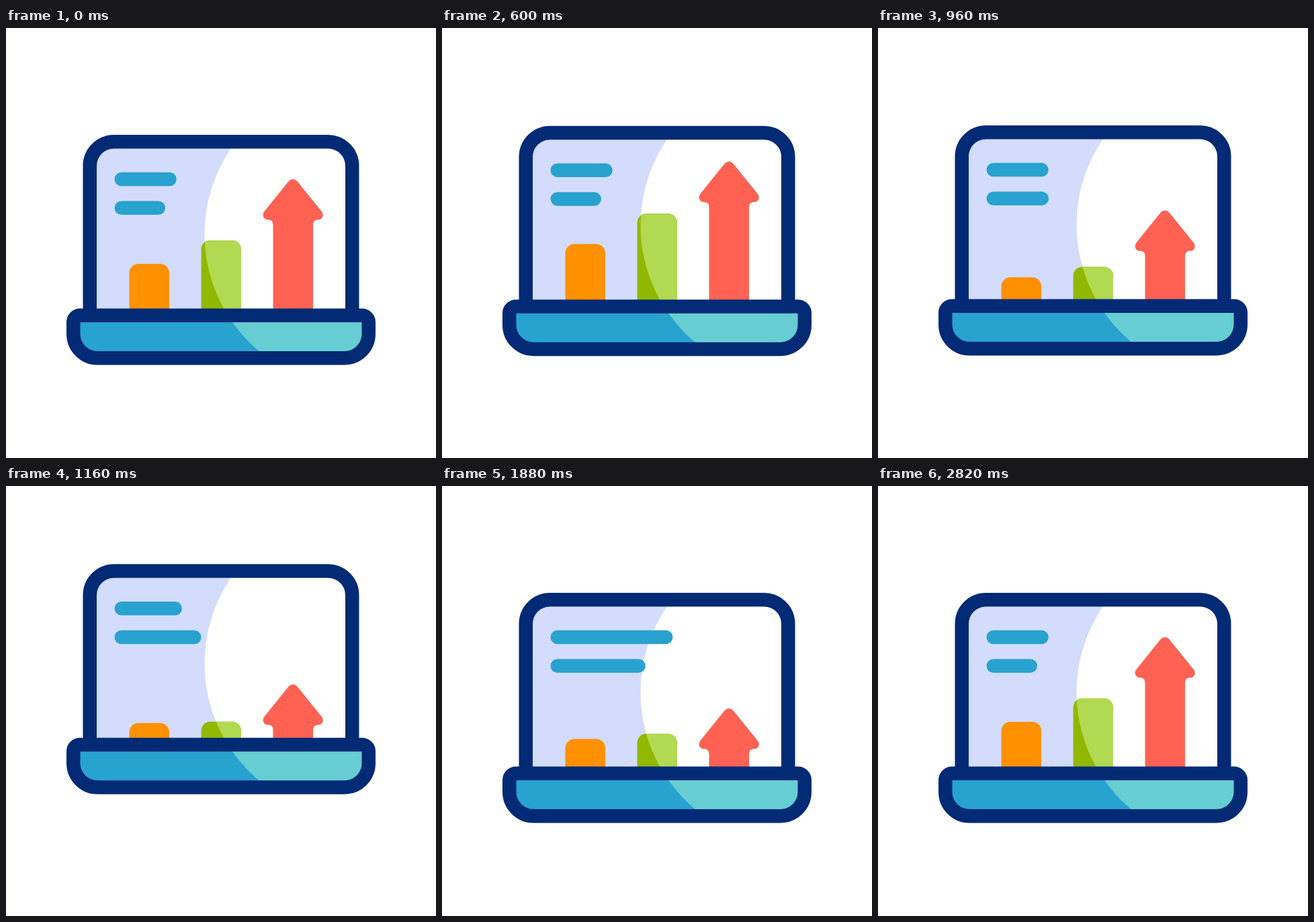
Recreate the animation shown at these times as an HTML page. Size 640 by 640 pixels, loop 2920 ms.

```html
<!DOCTYPE html>
<html lang="en">
<head>
<meta charset="utf-8">
<title>Laptop chart</title>
<style>
  html, body { margin: 0; width: 100%; height: 100%; overflow: hidden; background: #fff; }
  svg { display: block; width: 100%; height: 100%; }
  .shine { clip-path: url(#shine); }
  .frame { fill: none; stroke: #032a75; stroke-width: 20.5; }
  .line { stroke: #28a2cf; stroke-width: 20.5; stroke-linecap: round; }
</style>
</head>
<body>
<svg viewBox="0 0 640 640">
  <defs>
    <clipPath id="shine"><circle cx="522.8" cy="307" r="227.3"/></clipPath>
    <path id="screen" d="M124.75 428V205.25a36 36 0 0 1 36-36h318.5a36 36 0 0 1 36 36V428"/>
    <path id="base" d="M110.25 427.75h419.5a10 10 0 0 1 10 10v17.5a36 36 0 0 1-36 36h-367.5a36 36 0 0 1-36-36v-17.5a10 10 0 0 1 10-10z"/>
    <path id="orange"/>
    <path id="green"/>
    <path id="arrow"/>
  </defs>
  <g id="laptop">
    <use href="#screen" fill="#d3dcfd"/>
    <g class="shine"><use href="#screen" fill="#fff"/></g>
    <path id="line1" class="line"/>
    <path id="line2" class="line"/>
    <use href="#orange" fill="#ff9100"/>
    <use href="#green" fill="#90b800"/>
    <g class="shine"><use href="#green" fill="#b1d952"/></g>
    <use href="#arrow" fill="#ff6252"/>
    <use href="#screen" class="frame"/>
    <use href="#base" fill="#28a2cf"/>
    <g class="shine"><use href="#base" fill="#66cdd3"/></g>
    <use href="#base" class="frame"/>
  </g>
</svg>
<script>
const LOOP = 2920, FLOOR = 417.5;
const $ = id => document.getElementById(id);
const setPath = (id, d) => $(id).setAttribute('d', d);

// Smooth step from 0 to 1 between two times
function ease(t, from, to) {
  const x = Math.min(1, Math.max(0, (t - from) / (to - from)));
  return x * x * (3 - 2 * x);
}

// Hop up, drop, hop up again and settle
function lift(t) {
  const up = -46, swing = 79.4;
  return up * (ease(t, 200, 460) - ease(t, 1100, 1480))
    + swing * (ease(t, 460, 780) - ease(t, 780, 1100));
}

// Bars stretch one after another, shrink together, then regrow in turn
function barHeight(t, i, rest, peak, low) {
  const grow = 200 + 130 * i, regrow = 1520 + 60 * i * i;
  return rest + (peak - rest) * ease(t, grow, grow + 280)
    + (low - peak) * ease(t, grow + 280, 1120)
    + (rest - low) * ease(t, regrow, regrow + 800);
}

function barPath(x, h) {
  return `M${x} 430V${FLOOR - h + 13.5}a13.5 13.5 0 0 1 13.5-13.5h32.5a13.5 13.5 0 0 1 13.5 13.5V430z`;
}

function arrowPath(h) {
  const top = FLOOR - h;
  return `M420.5 ${top + 3.2}q6.5-6.4 13 0l36.2 44.8c4.5 6 .8 12.3-5.2 12.3q-7.5 0-7.5 7.5` +
    `V430H397.5V${top + 67.8}q0-7.5-7.5-7.5c-6 0-10-6.3-5.5-12.3z`;
}

// A text line grows from its rest end to its peak, then returns
function linePath(t, y, rest, peak, start, turn, stop) {
  const end = rest + (peak - rest) * (ease(t, start, turn) - ease(t, turn, stop));
  return `M171.75 ${y}H${end}`;
}

function draw(t) {
  $('laptop').setAttribute('transform', `translate(0 ${lift(t)})`);
  setPath('orange', barPath(183.5, barHeight(t, 0, 66.5, 89, 22)));
  setPath('green', barPath(290.5, barHeight(t, 1, 101.5, 128, 24)));
  setPath('arrow', arrowPath(barHeight(t, 2, 192.5, 218, 79.5)));
  setPath('line1', linePath(t, 225, 243.5, 344.5, 1060, 1640, 2800));
  setPath('line2', linePath(t, 267.75, 226.75, 325.75, 760, 1520, 2450));
}

const start = performance.now();
function tick() {
  draw((performance.now() - start) % LOOP);
  requestAnimationFrame(tick);
}
tick();
</script>
</body>
</html>
```
